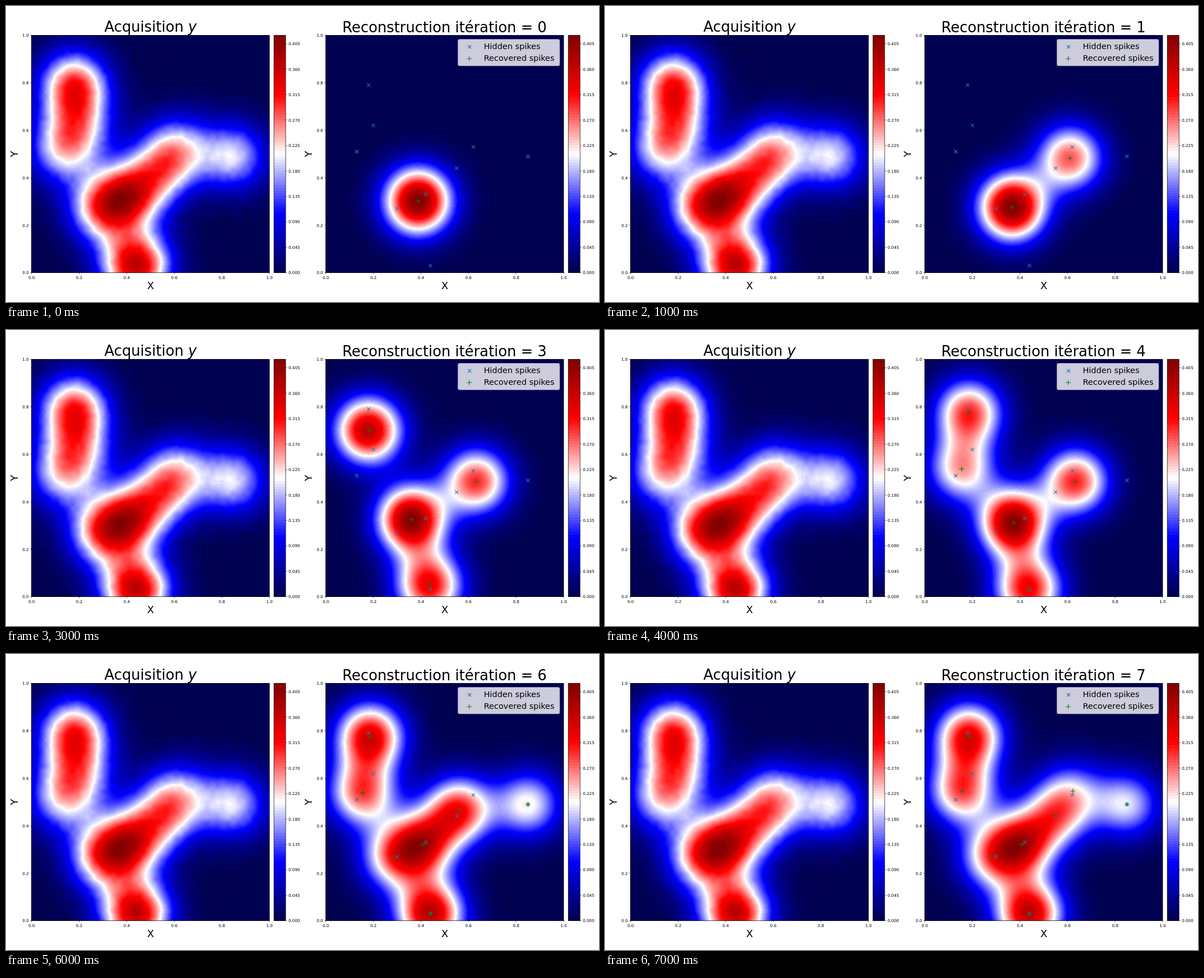
An HTML page with a canvas that plays this animation: 1058 by 529 pixels, repeating every 8 s.

```html
<!DOCTYPE html>
<html lang="fr">
<head>
<meta charset="utf-8">
<title>Reconstruction</title>
<style>
  html, body { margin: 0; width: 100%; height: 100%; overflow: hidden; background: #fff; }
  canvas, svg { position: absolute; left: 0; top: 0; width: 100%; height: 100%; }
  text { font-family: "DejaVu Sans", Verdana, sans-serif; fill: #000; }
</style>
</head>
<body>
<canvas id="field" width="1058" height="529"></canvas>
<svg id="plot" viewBox="0 0 1058 529" xmlns="http://www.w3.org/2000/svg"></svg>
<script>
const SIZE = 424.4, TOP = 52.3, BOTTOM = TOP + SIZE;
const LEFT_X = 45.7, RIGHT_X = 570.6;
const MAX = 0.42, BANDS = 84, SIGMA = 0.1;
const STEP_MS = 1000, STEPS = 8;

// Hidden spikes: x, y, amplitude.
const hidden = [
  [.18, .79, .28], [.2, .62, .16], [.13, .51, .165],
  [.3, .27, .24], [.42, .33, .25], [.55, .44, .16],
  [.62, .53, .15], [.85, .49, .185], [.44, .03, .355]
];

// Path of each recovered spike: iteration, x, y, held until the next key.
const tracks = [
  [[0, .389, .302], [1, .368, .276], [2, .36, .325], [4, .373, .312], [5, .356, .294], [6, .407, .321]],
  [[1, .61, .483], [3, .633, .486], [5, .561, .466], [7, .55, .443]],
  [[2, .435, .049], [4, .435, .034], [5, .44, .03]],
  [[3, .18, .7], [4, .187, .775]],
  [[4, .155, .538], [7, .157, .546]],
  [[5, .833, .5], [6, .85, .49]],
  [[6, .28, .265]],
  [[7, .622, .546]]
];

const gauss = (d2, s) => Math.exp(-d2 / (2 * s * s));
// Overlap of two unit Gaussian spots.
const overlap = (p, q) => gauss((p[0] - q[0]) ** 2 + (p[1] - q[1]) ** 2, SIGMA * Math.SQRT2);

// Least-squares amplitudes for the given places, by Gauss-Seidel sweeps.
function fitSpikes(places) {
  const goal = places.map(p => hidden.reduce((sum, h) => sum + h[2] * overlap(p, h), 0));
  const amps = places.map(() => 0);
  for (let sweep = 0; sweep < 200; sweep++) {
    places.forEach((p, i) => {
      const others = places.reduce((sum, q, j) => i === j ? sum : sum + amps[j] * overlap(p, q), 0);
      amps[i] = Math.max(0, goal[i] - others);
    });
  }
  return places.map(([x, y], i) => [x, y, amps[i]]);
}

function spikesAt(n) {
  const places = tracks.filter(keys => keys[0][0] <= n)
    .map(keys => keys.filter(k => k[0] <= n).pop().slice(1));
  return fitSpikes(places);
}

// Diverging map: navy, blue, white, red, maroon.
const stops = [[0, 0, 76], [0, 0, 255], [255, 255, 255], [255, 0, 0], [128, 0, 0]];
const palette = Array.from({ length: BANDS }, (_, i) => {
  const t = (i + 0.5) / BANDS * 4, k = Math.floor(t);
  return stops[k].map((c, j) => Math.round(c + (stops[k + 1][j] - c) * (t - k)));
});

function seeded(seed) {
  return () => {
    seed = (seed * 1664525 + 1013904223) % 4294967296;
    return seed / 4294967296;
  };
}

function makeNoise(cells, amp) {
  const rand = seeded(7), w = cells + 2;
  const grid = Array.from({ length: w * w }, () => (rand() + rand() + rand() - 1.5) * amp);
  const ease = t => t * t * (3 - 2 * t);
  return (x, y) => {
    const gx = x * cells, gy = y * cells, i = Math.floor(gx), j = Math.floor(gy);
    const u = ease(gx - i), v = ease(gy - j), k = j * w + i;
    return (grid[k] * (1 - u) + grid[k + 1] * u) * (1 - v) +
           (grid[k + w] * (1 - u) + grid[k + w + 1] * u) * v;
  };
}

const N = 425;
const coord = Array.from({ length: N }, (_, i) => (i + 0.5) / N);
const ctx = document.getElementById("field").getContext("2d");

// Sum of spots, scaled so that the highest one reaches the end of the map.
function fieldImage(spikes, noise = () => 0) {
  const cols = spikes.map(s => coord.map(x => gauss((x - s[0]) ** 2, SIGMA)));
  const rows = spikes.map(s => coord.map(y => s[2] * gauss((1 - y - s[1]) ** 2, SIGMA)));
  const values = new Float32Array(N * N);
  let peak = 0;
  for (let j = 0, p = 0; j < N; j++) {
    for (let i = 0; i < N; i++, p++) {
      let v = noise(coord[i], coord[j]);
      for (let k = 0; k < spikes.length; k++) v += cols[k][i] * rows[k][j];
      values[p] = v;
      peak = Math.max(peak, v);
    }
  }
  const img = ctx.createImageData(N, N);
  values.forEach((v, p) => {
    const band = Math.max(0, Math.min(BANDS - 1, Math.floor(v / peak * BANDS)));
    img.data.set([...palette[band], 255], p * 4);
  });
  return img;
}

const svg = document.getElementById("plot");

function add(tag, attrs, parent = svg) {
  const el = document.createElementNS("http://www.w3.org/2000/svg", tag);
  for (const k in attrs) el.setAttribute(k, attrs[k]);
  parent.appendChild(el);
  return el;
}

function label(str, x, y, size, anchor = "middle", extra = {}) {
  const el = add("text", { x, y, "font-size": size, "text-anchor": anchor, ...extra });
  el.textContent = str;
  return el;
}

const line = (d, color = "#000", width = 0.6, parent = svg) =>
  add("path", { d, fill: "none", stroke: color, "stroke-width": width }, parent);

const frame = (x, w) =>
  add("rect", { x, y: TOP, width: w, height: SIZE, fill: "none", stroke: "#000", "stroke-width": 0.7 });

const cross = (x, y) => line(`M${x - 3} ${y - 3}l6 6m0 -6l-6 6`, "#1f77b4", 1.08);
const plus = (x, y, parent) =>
  line(`M${x - 4.3} ${y}h8.6m-4.3 -4.3v8.6`, "#008000", 1.08, parent);

const px = x => RIGHT_X + SIZE * x;
const py = y => BOTTOM - SIZE * y;

function drawAxes(x0) {
  frame(x0, SIZE);
  for (let i = 0; i <= 5; i++) {
    const d = SIZE * i / 5, str = (i / 5).toFixed(1);
    line(`M${x0 + d} ${BOTTOM}v2.5M${x0} ${BOTTOM - d}h-2.5`);
    label(str, x0 + d, 487.6, 7.2);
    label(str, x0 - 5, BOTTOM - d + 2.7, 7.2, "end");
  }
  label("X", x0 + SIZE / 2, 506.4, 18);
  const yx = x0 - 24.4, yy = TOP + SIZE / 2;
  label("Y", yx, yy, 18, "middle", { transform: `rotate(-90 ${yx} ${yy})` });
}

function drawColorbar(x) {
  const w = 21, h = SIZE / BANDS;
  palette.forEach((c, i) => add("rect", {
    x, y: BOTTOM - h * (i + 1), width: w, height: h,
    fill: `rgb(${c})`, "shape-rendering": "crispEdges"
  }));
  frame(x, w);
  for (let i = 0; i < 10; i++) {
    const v = i * 0.045, y = BOTTOM - SIZE * v / MAX;
    line(`M${x + w} ${y}h2.5`);
    label(v.toFixed(3), x + w + 5, y + 2.7, 7.2, "start");
  }
}

function drawLegend() {
  add("rect", {
    x: 806.3, y: 59.5, width: 181.6, height: 47.4, rx: 2.9,
    fill: "#fff", stroke: "#ccc", "stroke-width": 0.72, opacity: 0.8
  });
  cross(827, 73);
  plus(826.5, 94);
  label("Hidden spikes", 852.4, 76.8, 14.5, "start");
  label("Recovered spikes", 852.4, 98, 14.5, "start");
}

drawAxes(LEFT_X);
drawAxes(RIGHT_X);
drawColorbar(478);
drawColorbar(1003.2);

const leftTitle = label("Acquisition ", LEFT_X + SIZE / 2, 45.8, 25.8);
add("tspan", { "font-style": "italic" }, leftTitle).textContent = "y";
const title = label("", RIGHT_X + SIZE / 2 - 0.4, 47.2, 25.8);

hidden.forEach(([x, y]) => cross(px(x), py(y)));
const recovered = add("g", {});
drawLegend();

ctx.putImageData(fieldImage(hidden, makeNoise(46, 0.006)), 45, 52);
const states = Array.from({ length: STEPS }, (_, n) => {
  const spikes = spikesAt(n);
  return { spikes, image: fieldImage(spikes) };
});

let shown = -1;
function render(ms) {
  const n = Math.floor(ms / STEP_MS) % STEPS;
  if (n === shown) return;
  shown = n;
  ctx.putImageData(states[n].image, 570, 52);
  title.textContent = `Reconstruction itération = ${n}`;
  recovered.replaceChildren();
  states[n].spikes.forEach(([x, y]) => plus(px(x), py(y), recovered));
}

const start = performance.now();
function tick() {
  render(performance.now() - start);
  requestAnimationFrame(tick);
}
tick();
</script>
</body>
</html>
```
